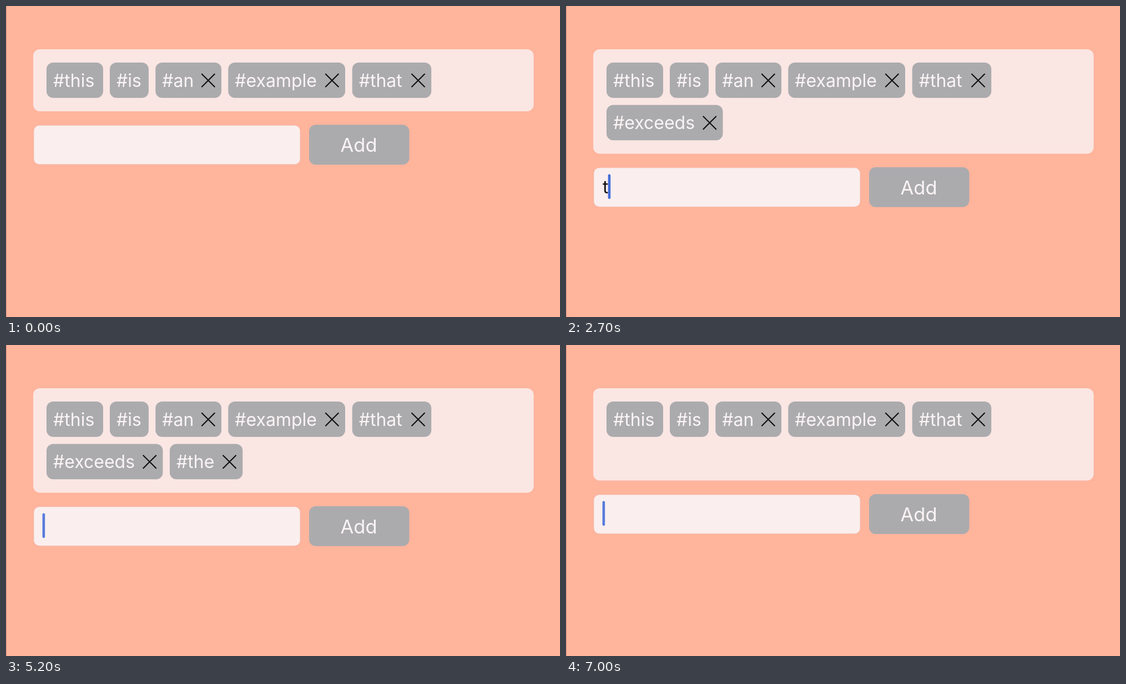
An HTML page for the animation above (7200 ms loop, 998 px wide and 561 px high).

```html
<!DOCTYPE html>
<html lang="en">
<head>
<meta charset="utf-8">
<title>Tag input</title>
<style>
  html, body { margin: 0; width: 100%; height: 100%; overflow: hidden; background: #ffb49c; }
  svg { display: block; width: 100%; height: 100%; }
  text { font-family: Inter, "Liberation Sans", sans-serif; font-size: 32px; white-space: pre; }
  .label { fill: #fbf4f5; }
  .chip { fill: #ababae; }
  .cross { stroke: #0c0a0b; stroke-width: 2; fill: none; }
</style>
</head>
<body>
<svg viewBox="0 0 998 561">
  <rect width="998" height="561" fill="#ffb49c"/>
  <rect width="1" height="561" fill="#cf8f80"/>
  <rect id="panel" x="49" y="78" width="901.5" rx="12" fill="#fae6e3"/>
  <g id="tags"></g>
  <g id="form">
    <rect x="50" y="215.3" width="480" height="70.5" rx="10" fill="#faefee" stroke="#e9b5a8" stroke-width=".6"/>
    <text id="typed" x="66" y="261" fill="#151112" letter-spacing="-.4"></text>
    <rect id="caret" y="227" width="4.6" height="44.5" rx="2" fill="#466fda"/>
    <rect id="button" class="chip" x="546" y="214.3" width="180.5" height="72" rx="12"/>
    <text class="label" x="635.5" y="263" text-anchor="middle" style="font-size:34.5px">Add</text>
  </g>
</svg>
<script>
const LOOP = 7200, STEP = 100;
const $ = id => document.getElementById(id);
const clamp = v => Math.max(0, Math.min(1, v));
const smooth = v => { v = clamp(v); return v * v * (3 - 2 * v); };

// x, width, row, whether removable, time added, time removed
const tags = [
  ["#this", 73, 102, 0, false],
  ["#is", 187, 70, 0, false],
  ["#an", 269.3, 118.7, 0, true],
  ["#example", 400.3, 210.7, 0, true],
  ["#that", 623.7, 142.5, 0, true],
  ["#exceeds", 73, 209.5, 1, true, 1900, 6800],
  ["#the", 295, 131.3, 1, true, 3200, 5800],
  ["#height", 439, 179.5, 1, true, 4100, 4800]
].map(([label, x, width, row, removable, added = -STEP * 2, removed = LOOP]) =>
  ({ label, x, width, row, removable, added, removed }));

// word, first keystroke, time submitted
const words = [["exceeds", 900, 1900], ["the", 2700, 3200], ["height", 3400, 4100]];
const presses = [[1800, 2000], [3200, 3550], [4000, 4150]];

function add(parent, name, attrs, content = "") {
  const node = document.createElementNS("http://www.w3.org/2000/svg", name);
  for (const key in attrs) node.setAttribute(key, attrs[key]);
  node.textContent = content;
  return parent.appendChild(node);
}

for (const tag of tags) {
  tag.node = add($("tags"), "g", { transform: `translate(${tag.x} ${102 + tag.row * 76.4})` });
  add(tag.node, "rect", { class: "chip", width: tag.width, height: 63.8, rx: 12 });
  add(tag.node, "text", { class: "label", x: 12, y: 44 }, tag.label);
  if (tag.removable) {
    add(tag.node, "path", { class: "cross", d: `M${tag.width - 35.7} 20.3l24 24m0-24l-24 24` });
  }
}

function typedAt(t) {
  const word = words.find(([, start, end]) => t >= start && t < end);
  return word ? word[0].slice(0, Math.floor((t - word[1]) / STEP) + 1) : "";
}

function caretOpacity(t, typing) {
  if (t < 500) return 0;
  if (typing || t < 4100) return 1;
  const phase = (t - 4100) % 600;
  return clamp((Math.abs(phase - 360) - 50) / 100);
}

function render(t) {
  const grown = 76.5 * (smooth((t - 1873) / 300) - smooth((t - 6894) / 300));
  $("panel").setAttribute("height", 112 + grown);
  $("form").setAttribute("transform", `translate(0 ${grown})`);

  for (const { node, added, removed } of tags) {
    const shown = clamp((t - added) / 200) * (1 - clamp((t - removed) / 200));
    node.setAttribute("opacity", shown);
  }

  const typed = typedAt(t);
  $("typed").textContent = typed;
  const end = typed ? $("typed").getComputedTextLength() : 0;
  $("caret").setAttribute("x", 65.6 + end);
  $("caret").setAttribute("opacity", caretOpacity(t, typed));

  const pressed = presses.some(([from, to]) => t >= from && t < to);
  $("button").setAttribute("opacity", pressed ? 0.3 : 1);
}

const begin = performance.now();
function tick() {
  const t = (performance.now() - begin) % LOOP;
  render(Math.min(Math.floor(t / STEP) * STEP, LOOP - 2 * STEP));
  requestAnimationFrame(tick);
}
tick();
</script>
</body>
</html>
```
